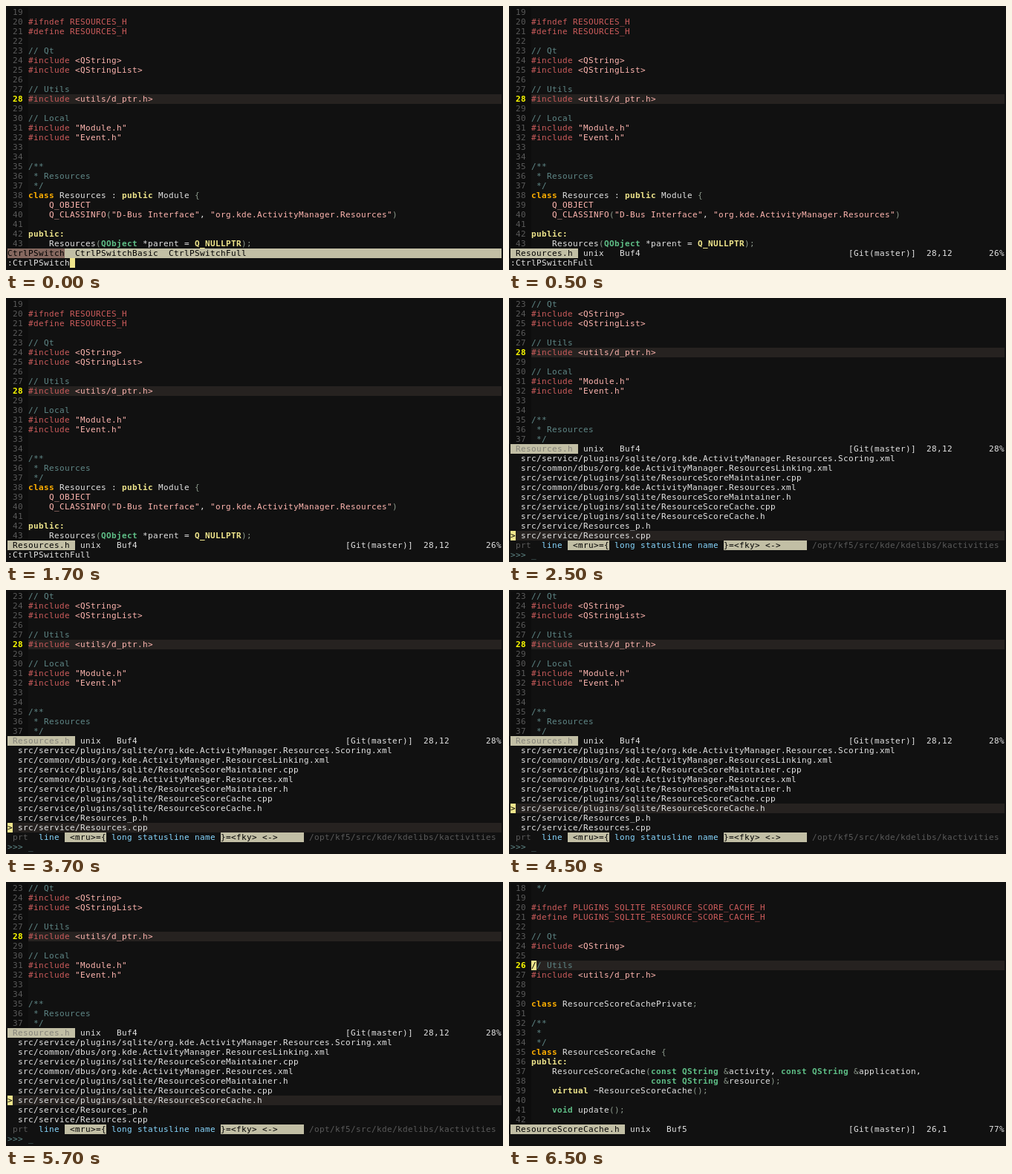
Write an HTML page that moves like this. It is 669x356 px and loops after 8000 ms.

```html
<!DOCTYPE html>
<html lang="en">
<head>
<meta charset="utf-8">
<title>Editor session</title>
<style>
  html, body { margin: 0; width: 100%; height: 100%; overflow: hidden; background: #111; }
  #screen { position: absolute; left: 2px; top: 2px; width: 665px;
    font: 11px/13px "DejaVu Sans Mono", monospace; color: #e4e4e4; white-space: pre; }
  #screen div { height: 13px; }
  #screen span { display: inline-block; height: 13px; vertical-align: top; }
  .num { color: #5a5a5a; background: #0d0d0d; }
  .line { background: #262220; }
  .line .num { color: #ff0; font-weight: bold; }
  .com { color: #5f8787; }
  .pre { color: #cd5c5c; }
  .str { color: #ffb6b0; }
  .cls { color: #ffaf00; font-weight: bold; }
  .key { color: #f0e68c; font-weight: bold; }
  .type { color: #5fbf87; font-weight: bold; }
  .punc { color: #8c998c; }
  .bar { color: #000; background: #c2bfa5; }
  .off { color: #85837a; background: #c2bfa5; }
  .pick { color: #000; background: #85685f; }
  .cursor { color: #000; background: #f0e68c; }
  .dim { color: #5a5a5a; }
  .blue { color: #87d7ff; }
</style>
</head>
<body>
<div id="screen"></div>
<script>
const screen_ = document.getElementById('screen');

// Keep every character in a 7px terminal cell
screen_.innerHTML = `<span>${'0'.repeat(100)}</span>`;
const cell = screen_.firstChild.getBoundingClientRect().width / 100;
screen_.style.letterSpacing = 7 - cell + 'px';

const header = `
#ifndef RESOURCES_H
#define RESOURCES_H

// Qt
#include <QString>
#include <QStringList>

// Utils
#include <utils/d_ptr.h>

// Local
#include "Module.h"
#include "Event.h"


/**
 * Resources
 */
class Resources : public Module {
    Q_OBJECT
    Q_CLASSINFO("D-Bus Interface", "org.kde.ActivityManager.Resources")

public:
    Resources(QObject *parent = Q_NULLPTR);`.split('\n');

const cache = ` */

#ifndef PLUGINS_SQLITE_RESOURCE_SCORE_CACHE_H
#define PLUGINS_SQLITE_RESOURCE_SCORE_CACHE_H

// Qt
#include <QString>

// Utils
#include <utils/d_ptr.h>


class ResourceScoreCachePrivate;

/**
 *
 */
class ResourceScoreCache {
public:
    ResourceScoreCache(const QString &activity, const QString &application,
                       const QString &resource);
    virtual ~ResourceScoreCache();

    void update();
`.split('\n');

const files = `plugins/sqlite/org.kde.ActivityManager.Resources.Scoring.xml
common/dbus/org.kde.ActivityManager.ResourcesLinking.xml
plugins/sqlite/ResourceScoreMaintainer.cpp
common/dbus/org.kde.ActivityManager.Resources.xml
plugins/sqlite/ResourceScoreMaintainer.h
plugins/sqlite/ResourceScoreCache.cpp
plugins/sqlite/ResourceScoreCache.h
Resources_p.h
Resources.cpp`.split('\n').map(f => 'src/' + (f.startsWith('common') ? f : 'service/' + f));

const syntax = new RegExp([
  /(?<com>\/\/.*|\/\*\*|^ \*.*)/,
  /(?<pre>#include|#(?:ifndef|define).*)/,
  /(?<str>"[^"]*"|&lt;.*?>|Q_OBJECT|Q_CLASSINFO)/,
  /(?<cls>\bclass\b)/,
  /(?<key>public:?|virtual|Q_NULLPTR)/,
  /(?<type>\b(?:const|void|QString|QObject)\b)/,
  /(?<punc>&amp;|[(){};])/
].map(r => r.source).join('|'), 'g');

const esc = s => s.replace(/&/g, '&amp;').replace(/</g, '&lt;');
const tag = (name, html) => `<span class="${name}">${html}</span>`;
const row = (html, name = '') => `<div class="${name}">${html}</div>`;

const paint = text => esc(text).replace(syntax, (match, ...args) => {
  const groups = args.at(-1);
  return tag(Object.keys(groups).find(k => groups[k]), match);
});

function code(lines, first, current, block) {
  return lines.map((text, i) => {
    const n = first + i, active = n === current;
    let html = paint(text);
    if (active && block) html = html.replace('/', tag('cursor', '/'));
    return row(tag('num', ` ${n} `) + html, active ? 'line' : '');
  }).join('');
}

function status(file, buffer, pos, percent, style = 'bar') {
  const name = ` ${file} `;
  const info = ` unix   Buf${buffer}`.padEnd(65 - name.length);
  return row(tag(style, name) + info + ('[Git(master)]  ' + pos).padEnd(27) + percent + '%');
}

function picker(selected) {
  const list = files.map((f, i) => i === selected
    ? row(tag('cursor', '>') + ' ' + f, 'line')
    : row('  ' + f)).join('');
  const prompt = tag('dim', ' prt  ') + tag('blue', 'line ') + tag('bar', ' &lt;mru>={') +
    tag('blue', ' long statusline name ') + tag('bar', '}=&lt;fky> &lt;->     ') +
    tag('dim', ' /opt/kf5/src/kde/kdelibs/kactivities');
  return code(header.slice(4, 19), 23, 28) + status('Resources.h', 4, '28,12', 28, 'off') +
    list + row(prompt) + row(tag('com', '>>> _'));
}

const editor = code(header, 19, 28);
const menu = tag('pick', 'CtrlPSwitch') +
  tag('bar', '  CtrlPSwitchBasic  CtrlPSwitchFull'.padEnd(84));

const scenes = [
  [0, editor + row(menu) + row(':CtrlPSwitch' + tag('cursor', ' '))],
  [500, editor + status('Resources.h', 4, '28,12', 26) + row(':CtrlPSwitchFull')],
  [2500, picker(8)],
  [4500, picker(6)],
  [6500, code(cache, 18, 26, true) + status('ResourceScoreCache.h', 5, '26,1', 77)]
];

let shown;
const start = performance.now();
function draw() {
  const t = (performance.now() - start) % 8000;
  const scene = scenes.findLast(([from]) => t >= from);
  if (scene !== shown) {
    shown = scene;
    screen_.innerHTML = scene[1];
  }
  requestAnimationFrame(draw);
}
draw();
</script>
</body>
</html>
```
